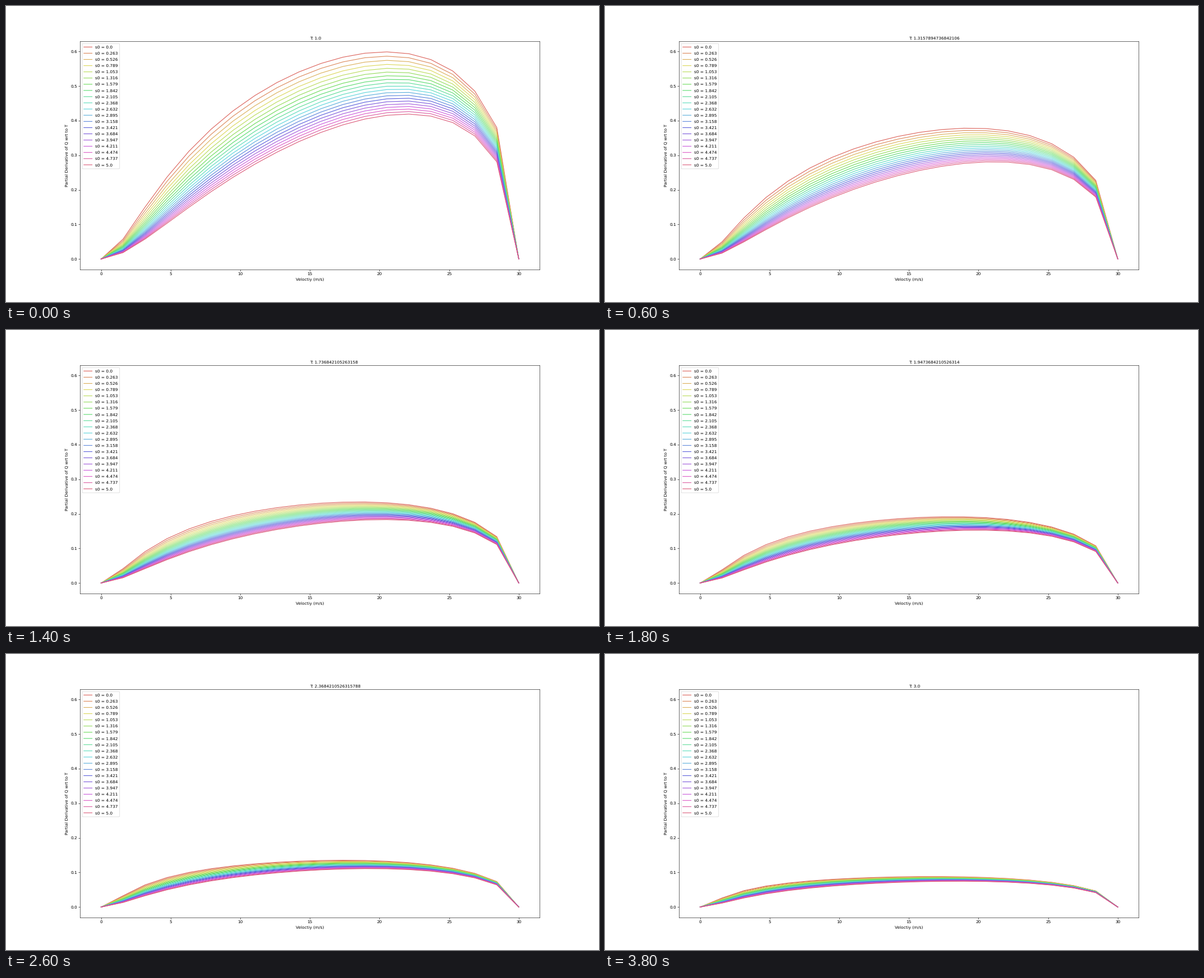
Animation of 1058 by 529 pixels, one loop 4 s. Source, as a matplotlib script:

```python
import colorsys

import matplotlib.pyplot as plt
import numpy as np
from matplotlib.animation import FuncAnimation
from matplotlib.patches import FancyBboxPatch

W, H, DPI = 1058, 529, 52.9
EM = 10 * DPI / 72          # pixels per em of 10 pt text
N = 20
V_MAX, CAR_LENGTH = 30, 5

plt.rcParams.update({
    "font.family": "DejaVu Sans",
    "font.size": 10,
    "text.hinting": "none",
})

speeds = np.linspace(0, V_MAX, N)
gaps = np.linspace(0, 5, N)
headways = np.linspace(1, 3, N)
colors = [colorsys.hls_to_rgb(i / N + 0.01, 0.6, 0.65) for i in range(N)]


def sensitivity(v, s0, T):
    """Size of dQ/dT for equilibrium flow in the intelligent driver model."""
    root = np.sqrt(1 - (v / V_MAX) ** 4)
    return v ** 2 * root / (s0 + v * T + CAR_LENGTH * root) ** 2


def draw_legend(fig, ax):
    layer = fig.add_axes([0, 0, 1, 1])
    layer.set(xlim=(0, W), ylim=(H, 0))
    layer.axis("off")

    box = ax.get_position()
    left = box.x0 * W + 0.5 * EM
    top = (1 - box.y1) * H + 0.5 * EM
    row, pitch, pad = 1.008 * EM, 1.508 * EM, 0.4 * EM
    width = 2 * pad + 2.8 * EM + 5.493 * EM
    height = 2 * pad + row + (N - 1) * pitch
    layer.add_patch(FancyBboxPatch(
        (left, top), width, height,
        boxstyle=f"round,pad=0,rounding_size={0.2 * EM}",
        facecolor=(1, 1, 1, 0.8), edgecolor=(0.8, 0.8, 0.8, 0.8), linewidth=1))

    x = left + pad
    for i, (s0, color) in enumerate(zip(gaps, colors)):
        base = top + pad + row - 0.216 * EM + i * pitch
        y = base - 0.35 * EM
        layer.plot([x, x + 2 * EM], [y, y], color=color, lw=1.5,
                   solid_capstyle="projecting", snap=False)
        layer.text(x + 2.8 * EM, base, f"s0 = {round(s0, 3)}", va="baseline")


fig = plt.figure(figsize=(W / DPI, H / DPI), dpi=DPI, facecolor="white")
ax = fig.add_axes([0.125, 0.11, 0.775, 0.77])
peak = sensitivity(speeds, 0, headways[0]).max()
ax.set(xlim=(-1.5, 31.5), ylim=(-0.05 * peak, 1.05 * peak),
       xticks=range(0, 31, 5), yticks=np.arange(7) / 10,
       xlabel="Veloctiy (m/s)", ylabel="Partial Derivative of Q wrt to T")
curves = [ax.plot(speeds, 0 * speeds, color=c, lw=1.5)[0] for c in colors]
title = ax.text(0.5, 1.01, "", transform=ax.transAxes)
draw_legend(fig, ax)


def update(frame):
    T = headways[frame]
    title.set_text(f"T: {T}")
    for curve, s0 in zip(curves, gaps):
        curve.set_ydata(sensitivity(speeds, s0, T))
    return [*curves, title]


anim = FuncAnimation(fig, update, frames=N, interval=200, repeat=True,
                     repeat_delay=0, blit=False)
plt.show()
```
